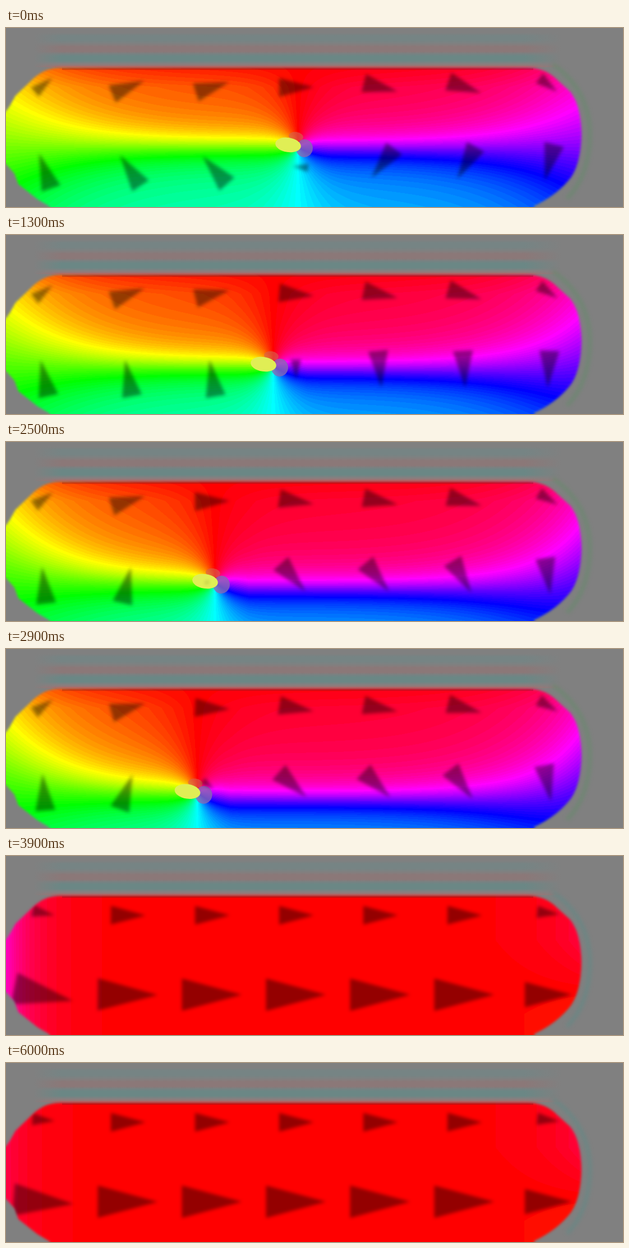
These frames come from a looping animation (1100x320 px, 6.1 s). An HTML page with a canvas:

```html
<!DOCTYPE html>
<html>
<head>
<meta charset="utf-8">
<style>
html, body { margin: 0; width: 100%; height: 100%; overflow: hidden; background: #808080; }
canvas { display: block; }
</style>
</head>
<body>
<canvas id="stage" width="1100" height="320"></canvas>
<script>
const W = 1100, H = 320, LOOP = 6100, STEP = 100;
const ctx = document.getElementById('stage').getContext('2d');
const layer = document.createElement('canvas');
layer.width = W;
layer.height = H;
const field = layer.getContext('2d');
const pixels = field.createImageData(W, H);
const rgba = new Uint32Array(pixels.data.buffer);

const body = new Path2D(`M-20 154 L0 149 L7 139 L17 121 L42 97 Q66 71 96 71
  L932 71 Q962 72 982 92 L1006 114 Q1025 138 1026 190 Q1025 240 1008 266
  Q984 298 942 318 L940 340 L80 340 L78 319 L56 306 L22 279 L15 260 L0 243 L-20 240 Z`);

// Vortex centre: time, x, y
const path = [
  [0, 520, 212], [600, 503, 225], [1300, 476, 234], [2500, 372, 252],
  [3200, 317, 262], [3300, 306, 277], [3400, 293, 305], [3500, 280, 345]
];

const clamp = (v, lo, hi) => Math.min(hi, Math.max(lo, v));

// One packed colour for each degree of hue
const wheel = Uint32Array.from({ length: 360 }, (_, h) => {
  const part = n => Math.round(255 * clamp(Math.abs((h / 60 + n) % 6 - 3) - 1, 0, 1));
  return (255 << 24 | part(2) << 16 | part(4) << 8 | part(0)) >>> 0;
});

function stateAt(t) {
  let i = 0;
  while (i < path.length - 2 && t > path[i + 1][0]) i++;
  const [t0, x0, y0] = path[i], [t1, x1, y1] = path[i + 1];
  const k = clamp((t - t0) / (t1 - t0), 0, 1);
  return {
    x: x0 + (x1 - x0) * k,
    y: y0 + (y1 - y0) * k,
    calm: clamp((t - 3400) / 150, 0, 1),
    left: 45 * Math.exp(-(t - 3900) / 2030)
  };
}

// Direction of the field in degrees, -180 to 180
function angleAt(x, y, s) {
  const leftEnd = Math.exp(-x / 100), rightEnd = Math.exp((x - 1026) / 100);
  let angle = 0;
  if (s.calm < 1) {
    const sag = (3 + 0.16 * (s.y - 212)) * clamp((x - s.x) / 60, 0, 1);
    const mid = s.y + sag + (207 - s.y) * leftEnd + (213 - s.y) * rightEnd ** 2;
    const dy = y - mid, far = Math.abs(dy);
    const spread = x > s.x && dy < 0 ? 0.05 : 0.12;
    const wall = clamp((y - 55) / 50, 0, 1);
    const reach = (24 + spread * far) * wall + 110 * (leftEnd + rightEnd);
    const dx = reach * Math.tanh((x - s.x) / (24 + 0.5 * far));
    angle = Math.atan2(-dx, -dy) * 180 / Math.PI * (1 - s.calm);
  }
  if (s.calm > 0) {
    const tilt = clamp((y - 240) / 6, -15, 7);
    angle += s.calm * (tilt * rightEnd ** 1.5 - s.left * leftEnd ** 2);
  }
  return angle;
}

function paintField(s) {
  for (let y = 60; y < H; y++) {
    for (let x = 0; x < 1040; x++) {
      const angle = Math.round(angleAt(x, y, s) / 3) * 3;
      rgba[y * W + x] = wheel[(angle + 360) % 360];
    }
  }
  field.putImageData(pixels, 0, 0);
}

function arrow(x, y, length, angle, back = 0) {
  field.save();
  field.translate(x, y);
  field.rotate(-angle * Math.PI / 180);
  field.translate(-back, 0);
  field.beginPath();
  field.moveTo(length / 2, 0);
  field.lineTo(-length / 2, -length * 0.27);
  field.lineTo(-length / 2, length * 0.27);
  field.fill();
  field.restore();
}

function paintArrows(s) {
  field.filter = 'blur(3px)';
  field.fillStyle = 'rgba(0,0,0,.42)';
  for (let i = 0; i < 7; i++) {
    const x = 67 + 150 * i, end = i % 6 === 0;
    arrow(x + (end ? 0 : 1), end ? 102 : 106, end ? 40 : 62, angleAt(x, 100, s));
    const near = Math.min(1, Math.hypot(x - s.x, 245 - s.y) / 80);
    const full = i === 6 ? 84 : 107;
    const length = 66 * near * (1 - s.calm) + full * s.calm;
    arrow(x, 248, length, angleAt(x, 238, s), 8 * (1 - s.calm));
  }
  field.filter = 'none';
}

function spot(x, y, rx, ry, color) {
  field.fillStyle = color;
  field.beginPath();
  field.ellipse(x, y, rx, ry, 0.15, 0, 7);
  field.fill();
}

function paintCore(s) {
  if (s.calm > 0) return;
  spot(s.x - 3, s.y - 18, 13, 8, 'rgba(215,95,75,.65)');
  spot(s.x + 12, s.y + 3, 15, 16, 'rgba(135,105,180,.8)');
  spot(s.x - 17, s.y - 3, 23, 13, '#e0ee55');
}

function gradient(x, y, stops) {
  const g = ctx.createLinearGradient(0, 0, x, y);
  stops.forEach(([at, color]) => g.addColorStop(at, color));
  return g;
}

const bands = gradient(0, 70, [
  [0, '#808080'], [0.12, '#808080'], [0.2, '#768484'], [0.32, '#768484'], [0.4, '#808080'],
  [0.48, '#8b7878'], [0.6, '#8b7878'], [0.66, '#788282'], [0.72, '#6b8785'],
  [0.84, '#6b8785'], [0.91, '#858080'], [1, '#a87070']
]);
const fade = gradient(W, 0, [
  [0, '#808080'], [0.045, '#808080'], [0.09, '#80808000'],
  [0.84, '#80808000'], [0.9, '#808080'], [1, '#808080']
]);
const ring = new Path2D('M975 65 Q1040 110 1041 190 Q1040 265 1000 305');

function paintBackdrop(s) {
  ctx.fillStyle = '#808080';
  ctx.fillRect(0, 0, W, H);
  ctx.fillStyle = bands;
  ctx.fillRect(0, 0, W, 70);
  ctx.fillStyle = fade;
  ctx.fillRect(0, 0, W, 70);
  ctx.filter = 'blur(3px)';
  ctx.lineWidth = 8;
  ctx.strokeStyle = s.calm ? 'rgba(70,145,140,.3)' : 'rgba(80,145,90,.3)';
  ctx.stroke(ring);
  ctx.filter = 'none';
}

function draw(t) {
  const s = stateAt(t);
  paintField(s);
  paintCore(s);
  paintArrows(s);

  field.fillStyle = 'rgba(100,0,0,.25)';
  field.fillRect(100, 71, 840, 4);

  // Soft rim
  field.globalCompositeOperation = 'destination-in';
  field.filter = 'blur(2px)';
  field.fillStyle = '#000';
  field.fill(body);
  field.filter = 'none';
  field.globalCompositeOperation = 'source-over';

  paintBackdrop(s);
  ctx.drawImage(layer, 0, 0);
}

let shown = -1;
function tick(now) {
  const t = Math.floor(now % LOOP / STEP) * STEP;
  if (t !== shown) draw(shown = t);
  requestAnimationFrame(tick);
}
requestAnimationFrame(tick);
</script>
</body>
</html>
```
